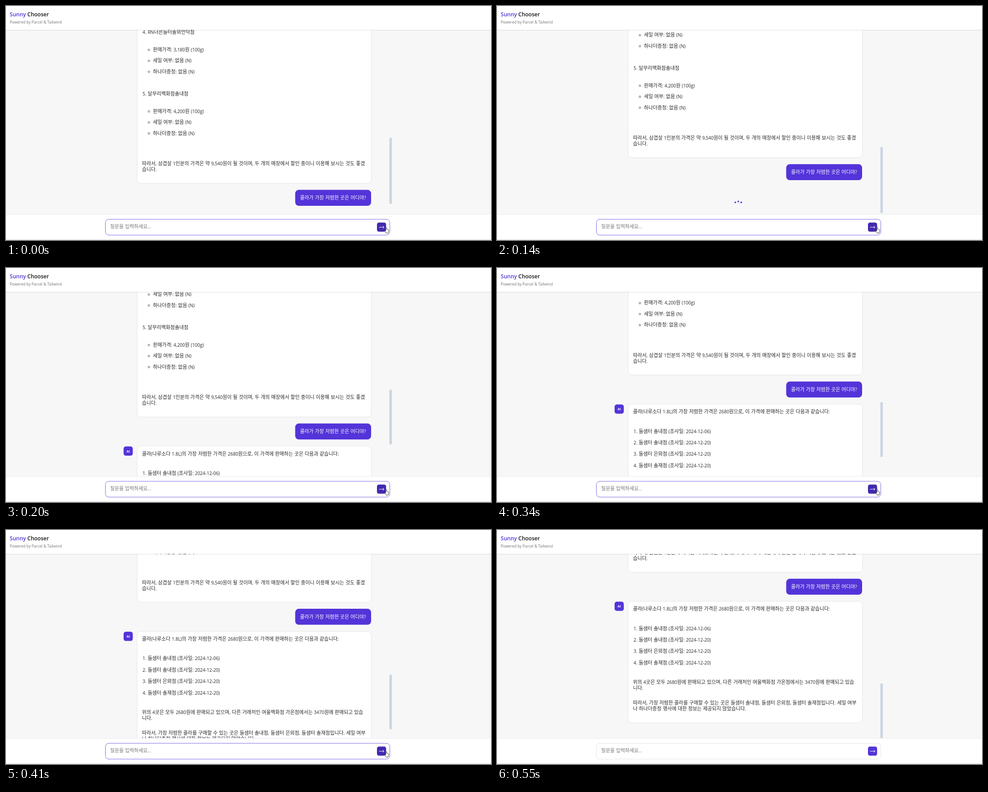
Write an HTML page that moves like this. It is 1076 by 520 pixels and loops after 0.62 s.

```html
<!DOCTYPE html>
<html lang="ko">
<head>
<meta charset="utf-8">
<title>Chat</title>
<style>
  html, body { margin: 0; width: 100%; height: 100%; overflow: hidden; background: #f7f7f7; }
  svg { display: block; width: 1076px; height: 520px; }
  text {
    font: 10.88px "Open Sans", "Noto Sans CJK KR", "Noto Sans CJK", sans-serif;
    white-space: pre; word-spacing: .2px; fill: #27272a;
  }
  .latin { font-size: 10px; }
  .card { fill: #fff; filter: drop-shadow(0 .8px 1px rgba(0, 0, 0, .15)); }
  .brand { fill: #5334d9; }
  .light { fill: #fff; }
  .title { font-size: 12px; font-weight: 600; word-spacing: 0; fill: #18181b; }
  .sub { font-size: 8.5px; word-spacing: 0; fill: #737373; }
  .hint { fill: #757575; }
  .badge { font-size: 7.2px; font-weight: 700; fill: #fff; }
</style>
</head>
<body>
<svg viewBox="0 0 1076 520">
  <rect width="1076" height="520" fill="#f7f7f7"/>
  <g id="feed">
    <rect class="card" x="291.5" y="-300" width="518.5" height="693.5" rx="8"/>
    <rect class="brand" x="641.6" y="408.6" width="168.4" height="35.5" rx="8"/>
    <g id="history"></g>
    <g id="loader" class="brand"></g>
    <g id="answer">
      <rect class="brand" x="260.9" y="459.6" width="20.4" height="20.5" rx="5"/>
      <text class="badge" x="271.1" y="472.7" text-anchor="middle">AI</text>
      <rect class="card" x="291.5" y="459.3" width="518.5" height="268.7" rx="8"/>
    </g>
  </g>
  <rect id="thumb" x="850.6" width="5.4" rx="2.7" fill="#cbd5e1"/>

  <rect width="1076" height="53" fill="#fff"/>
  <rect y="53" width="1076" height="1" fill="#000" opacity=".09"/>
  <rect y="54" width="1076" height="1" fill="#000" opacity=".03"/>
  <text class="title" x="8.3" y="22.6"><tspan class="brand">Sunny</tspan> Chooser</text>
  <text class="sub" x="8.4" y="39">Powered by Parcel &amp; Tailwind</text>

  <rect y="462.5" width="1076" height="57.5" fill="#fff"/>
  <rect y="462.5" width="1076" height="1" fill="#e7e7e7"/>
  <rect y="518.8" width="1076" height="1.2" fill="#dedede"/>
  <rect id="field" x="220.5" y="474" width="631" height="35.1" rx="7.5" fill="#fff"/>
  <g id="prompt"></g>
  <rect id="send" x="823" y="481.3" width="20.3" height="20.2" rx="4.5"/>
  <path d="M827.6 491.6H838.6M835.8 488.8L838.8 491.6L835.8 494.4" fill="none" stroke="#fff" stroke-width="1"/>
  <path id="hand" d="M842.6 499V492.6Q843.5 491 844.4 492.6V496Q845.6 495.2 846.2 496.5Q847.3 496 847.7 497.2Q848.9 496.9 849 498.2V501Q848.4 502.6 847.9 504.6H843.2Q842.3 502.4 840.4 500.2Q840.2 498.2 842.6 499.6Z"
    fill="#fff" stroke="#222" stroke-width=".9" stroke-linejoin="round"/>
</svg>
<script>
const LOOP = 620;
const VIEW = { bottom: 463, height: 410 };
// Scroll distance at each screen refresh: a short glide, then a long one.
const SCROLL = [0, 33.2, 57, 63, 92, 156.3, 233.5, 281, 300.3];
const ANSWER_STEP = 3;
const BLUR_STEP = 8;

const $ = id => document.getElementById(id);

function add(parent, tag, attrs, content = "") {
  const el = document.createElementNS("http://www.w3.org/2000/svg", tag);
  for (const key in attrs) el.setAttribute(key, attrs[key]);
  el.textContent = content;
  return parent.appendChild(el);
}

// Writes a line centred on y, with non-Hangul runs slightly smaller.
function write(parent, x, y, line, cls = "") {
  const el = add(parent, "text", { x, y: y + 3.9, class: cls });
  for (const run of line.match(/[\s\uAC00-\uD7A3]+|[^\s\uAC00-\uD7A3]+/g)) {
    const latin = /^[^\s\uAC00-\uD7A3]/.test(run);
    add(el, "tspan", { class: (latin ? "latin " : "") + cls }, run);
  }
}

function store(y, name, price) {
  const box = $("history");
  write(box, 303, y, name);
  [`판매가격: ${price}원 (100g)`, "세일 여부: 없음 (N)", "하나더증정: 없음 (N)"].forEach((line, i) => {
    const row = y + 39 + i * 24.4;
    add(box, "circle", { cx: 317, cy: row + .5, r: 1.9, fill: "none", stroke: "#333", "stroke-width": .8 });
    write(box, 326, row, line);
  });
}

store(58, "4. RN너른들터솔뫼언덕점", "3,180");
store(194.8, "5. 달무리백화점솔내점", "4,200");
write($("history"), 301.8, 350.2, "따라서, 삼겹살 1인분의 가격은 약 9,540원이 될 것이며, 두 개의 매장에서 할인 중이니 이용해 보시는 것도 좋겠");
write($("history"), 301.8, 363.2, "습니다.");
write($("history"), 652.2, 426.2, "콜라가 가장 저렴한 곳은 어디야?", "light");

const answer = $("answer");
write(answer, 301.8, 475.8, "콜라(나루소다 1.8L)의 가장 저렴한 가격은 2680원으로, 이 가격에 판매하는 곳은 다음과 같습니다:");
["솔내점 (조사일: 2024-12-06)", "솔내점 (조사일: 2024-12-20)", "은뫼점 (조사일: 2024-12-20)", "솔재점 (조사일: 2024-12-20)"]
  .forEach((line, i) => write(answer, 303, 519 + i * 25.4, `${i + 1}. 들샘터 ${line}`));
write(answer, 301.8, 638.6, "위의 4곳은 모두 2680원에 판매되고 있으며, 다른 거래처인 여울백화점 가온점에서는 3470원에 판매되고 있습");
write(answer, 301.8, 651.6, "니다.");
write(answer, 301.8, 684.3, "따라서, 가장 저렴한 콜라를 구매할 수 있는 곳은 들샘터 솔내점, 들샘터 은뫼점, 들샘터 솔재점입니다. 세일 여부");
write(answer, 301.8, 697.3, "나 하나더증정 행사에 대한 정보는 제공되지 않았습니다.");
write($("prompt"), 231, 489.8, "질문을 입력하세요...", "hint");

const dots = [528.7, 535.3, 541.9].map(cx => add($("loader"), "circle", { cx, r: 1.8 }));

function stepAt(t) {
  return t < 140 ? Math.floor(t / 70) : Math.floor((t + 10) / 70);
}

function render(t) {
  const step = stepAt(t);
  const scroll = SCROLL[step];
  const answered = step >= ANSWER_STEP;
  const blurred = step >= BLUR_STEP;

  $("feed").setAttribute("transform", `translate(0 ${-scroll})`);
  answer.style.display = answered ? "" : "none";
  $("loader").style.display = answered ? "none" : "";
  dots.forEach((dot, i) => dot.setAttribute("cy", i === step - 1 ? 491.4 : 493.4));

  const ratio = VIEW.height / (answered ? 1376 : 1140);
  const left = (answered ? 300.3 : 64) - scroll;
  const size = VIEW.height * ratio;
  $("thumb").setAttribute("height", size);
  $("thumb").setAttribute("y", VIEW.bottom - size - left * ratio);

  $("field").setAttribute("stroke", blurred ? "#e5e5e5" : "#7c64e2");
  $("send").setAttribute("fill", blurred ? "#5334d9" : "#4328b0");
  $("hand").style.display = blurred ? "none" : "";
}

const start = performance.now();
function tick() {
  render((performance.now() - start) % LOOP);
  requestAnimationFrame(tick);
}
tick();
</script>
</body>
</html>
```
